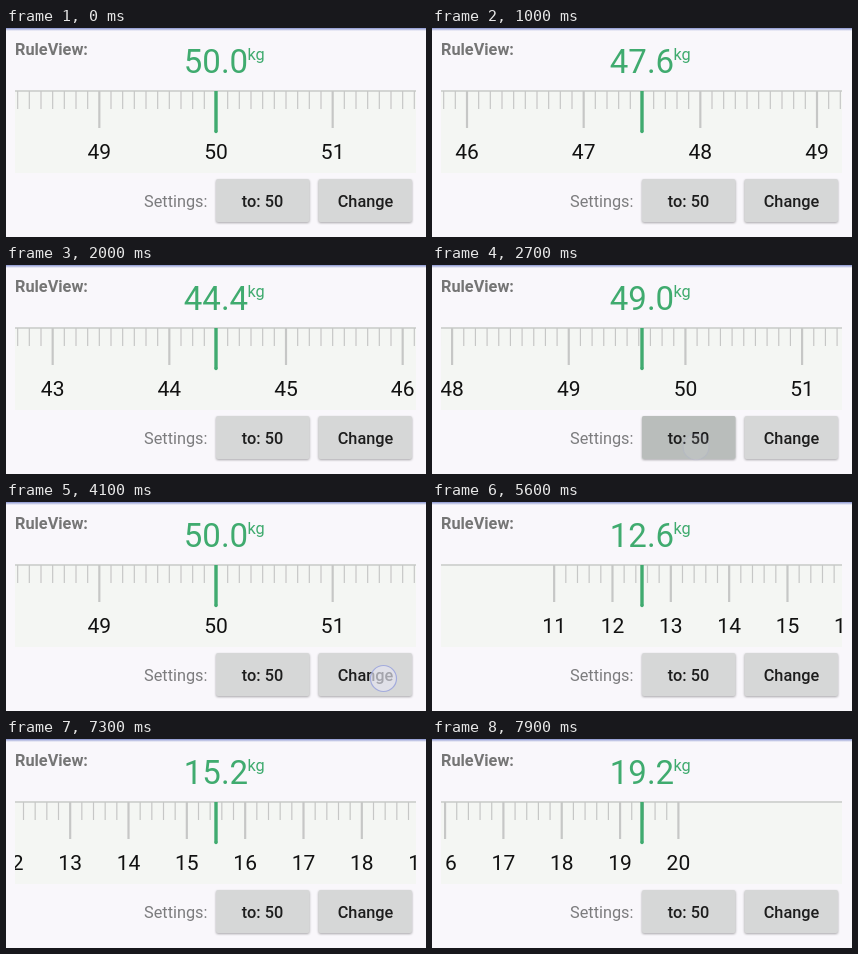
Recreate the animation shown at these times as an HTML page. Size 420 by 209 pixels, loop 8 s.

```html
<!DOCTYPE html>
<html lang="en">
<head>
<meta charset="utf-8">
<title>RuleView</title>
<style>
  html, body { margin: 0; width: 100%; height: 100%; overflow: hidden; background: #f9f7fb; }
  svg { display: block; width: 420px; height: 209px; font: 16.3px Roboto, sans-serif; }
  .button { fill: #d6d7d7; filter: drop-shadow(0 1px 1px rgba(0, 0, 0, .33)); }
  .caption { font-weight: 500; fill: #1d1d1d; text-anchor: middle; }
  .label { font-size: 21px; fill: #111; text-anchor: middle; }
  .value { font-size: 33px; text-anchor: middle; }
  .green { fill: #40ab6f; }
  #touch { fill: #e4e5f0; fill-opacity: .68; stroke: #a3abdc; stroke-width: 1.2; }
</style>
</head>
<body>
<svg viewBox="0 0 420 209">
  <defs>
    <clipPath id="panel"><rect x="9" y="62" width="401" height="83"/></clipPath>
    <linearGradient id="shade" x2="0" y2="1">
      <stop stop-color="#8793cf"/><stop offset="1" stop-color="#f9f7fb"/>
    </linearGradient>
  </defs>
  <rect width="420" height="209" fill="#f9f7fb"/>
  <rect width="420" height="3" fill="url(#shade)"/>
  <text x="9" y="27" font-weight="700" fill="#757575">RuleView:</text>
  <text id="value" class="value green" x="210" y="45"></text>
  <text class="green" x="241.5" y="32">kg</text>
  <rect x="9" y="62" width="401" height="83" fill="#f4f6f3"/>
  <path d="M9 63H410" stroke="#c9cac9" stroke-width="1.3"/>
  <g id="ruler" clip-path="url(#panel)"></g>
  <path d="M210 63V103.5" stroke="#40ab6f" stroke-width="3.4"/>
  <circle class="green" cx="210" cy="103.5" r="1.7"/>
  <text x="138" y="179" fill="#7c7c7e">Settings:</text>
  <rect class="button" x="210" y="151" width="93.5" height="43" rx="2"/>
  <rect id="pressTo" x="210" y="151" width="93.5" height="43" rx="2" fill="#b9bdbb"/>
  <text class="caption" x="256.5" y="179">to: 50</text>
  <rect class="button" x="312.5" y="151" width="93.5" height="43" rx="2"/>
  <rect id="pressChange" x="312.5" y="151" width="93.5" height="43" rx="2" fill="#b9bdbb"/>
  <text class="caption" x="359.5" y="179">Change</text>
  <circle id="touch" r="13"/>
</svg>
<script>
const $ = id => document.getElementById(id);
const LOOP = 8000, STEP = 100, GAP = 35 / 3, MID = 210, LAG = 20, SWITCH = 4300;
const wide = { min: 0, max: 100, perUnit: 10 };
const narrow = { min: 11, max: 20, perUnit: 5 };

// [time, value] points of the drags and flings
const dragDown = [[650, 50], [700, 49.7], [900, 48.4], [1100, 46.6], [1250, 45.5],
  [1400, 45], [1600, 44.657], [1800, 44.48], [2000, 44.4]];
const dragNarrow = [[5350, 15], [5500, 13.5], [5600, 12.506], [5700, 11.9], [5800, 11.55],
  [6000, 11.18], [6200, 11.05], [6350, 11], [6850, 11], [7000, 12.2], [7200, 14.4],
  [7400, 16.6], [7600, 18.1], [7700, 18.61], [7800, 19.05], [7900, 19.376]];

function along(points, t) {
  if (t <= points[0][0]) return points[0][1];
  for (let i = 1; i < points.length; i++) {
    const [t0, a] = points[i - 1], [t1, b] = points[i];
    if (t <= t1) return a + (b - a) * (t - t0) / (t1 - t0);
  }
  return points[points.length - 1][1];
}

function valueAt(t) {
  if (t >= SWITCH) return along(dragNarrow, t);
  if (t < 2605) return along(dragDown, t);
  const left = Math.max(0, 1 - (t - 2605) / 128);   // ease out to 50
  return 50 - 5.6 * left * left;
}

function ruler(value, { min, max, perUnit }) {
  const reach = 220 / GAP, now = value * perUnit;
  const last = Math.min(max * perUnit, Math.floor(now + reach));
  let out = "";
  for (let i = Math.max(min * perUnit, Math.ceil(now - reach)); i <= last; i++) {
    const x = (MID + (i - now) * GAP).toFixed(2), whole = i % perUnit === 0;
    out += `<path d="M${x} 63V${whole ? 100 : 81}" stroke="#c6c7c6" stroke-width="${whole ? 2.2 : 1.2}"/>`;
    if (whole) out += `<text class="label" x="${x}" y="131">${i / perUnit}</text>`;
  }
  return out;
}

// full strength until hold, then fading out until end
const pulse = (t, start, hold, end) =>
  t < start || t >= end ? 0 : t <= hold ? 1 : (end - t) / (end - hold);

function draw(t) {
  const scale = t < SWITCH ? wide : narrow;
  const shown = valueAt(t < SWITCH ? t - LAG : Math.max(SWITCH, t - LAG));
  const ticks = Math.floor((shown - scale.min) * scale.perUnit + 1e-6);
  $("value").textContent = (scale.min + ticks / scale.perUnit).toFixed(1);
  $("ruler").innerHTML = ruler(valueAt(t), scale);
  $("pressTo").style.opacity = pulse(t, 2600, 2700, 3100);
  $("pressChange").style.opacity = pulse(t, SWITCH, SWITCH, 4500);
  const second = t >= 4000;
  $("touch").setAttribute("cx", second ? 377.5 : 264);
  $("touch").setAttribute("cy", second ? 176.5 : 182);
  $("touch").style.opacity = second ? pulse(t, 4100, 4200, 4400) : pulse(t, 2500, 2600, 2720);
}

let drawn = -1;
function tick() {
  const t = Math.floor(performance.now() % LOOP / STEP) * STEP;
  if (t !== drawn) draw(drawn = t);
  requestAnimationFrame(tick);
}
tick();
</script>
</body>
</html>
```
